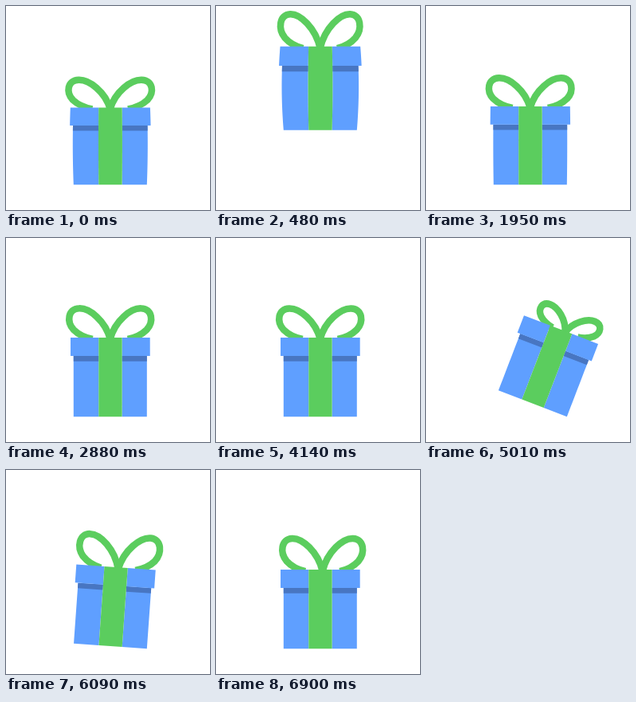
Animation, 256 px wide and 256 px high, one loop 6930 ms. Source, as an HTML page with a canvas:

```html
<!DOCTYPE html>
<html lang="en">
<head>
<meta charset="utf-8">
<title>Bouncing gift</title>
<style>
html, body { margin: 0; width: 100%; height: 100%; overflow: hidden; background: #fff; }
canvas { display: block; width: 100vw; height: 100vh; }
</style>
</head>
<body>
<canvas id="stage" width="256" height="256"></canvas>
<script>
const ctx = document.getElementById('stage').getContext('2d');
const LOOP = 6930, STEP = 30;
const BLUE = '#5f9fff', SHADE = '#4876c2', GREEN = '#5bcd5e';
const MID = 130.7, FLOOR = 224.3, TOP = 125, HEIGHT = FLOOR - TOP, BOW = 41;
const PIVOT = 177;

// Eased value from [time, value] pairs.
function track(t, keys) {
  if (t <= keys[0][0]) return keys[0][1];
  for (let i = 1; i < keys.length; i++) {
    const [t0, a] = keys[i - 1], [t1, b] = keys[i];
    if (t <= t1) {
      const p = (t - t0) / (t1 - t0);
      return a + (b - a) * p * p * (3 - 2 * p);
    }
  }
  return keys[keys.length - 1][1];
}

const arc = (t, from, to, peak) => {
  const p = (t - from) / (to - from);
  return p > 0 && p < 1 ? 4 * peak * p * (1 - p) : 0;
};

// Vertical stretch: positive is taller, negative is squashed.
function stretchAt(t) {
  if (t < 720) {
    return track(t, [[0, -.025], [150, -.25], [300, .2], [450, .05], [620, .13], [720, -.31]]);
  }
  const s = t - 720;
  return t < 3600 ? -.31 * Math.exp(-.0027 * s) * Math.cos(2 * Math.PI * s / 600) : 0;
}

// Tilt in degrees about the lower right corner.
function tiltAt(t) {
  if (t < 4410) return 0;
  if (t < 5430) return 16.5 * (1 - Math.cos(Math.PI * (t - 4410) / 1020));
  if (t < 5850) return 33 * (1 - ((t - 5430) / 420) ** 2);
  return arc(t, 5850, 6300, 4.1) + arc(t, 6300, 6500, .8);
}

function bowAt(t, stretch) {
  return {
    lean: track(t, [[4200, 0], [4350, 6], [5010, 6], [5430, 3], [5800, 4], [5940, -3],
      [6090, 3], [6240, 1], [6480, 5], [6900, 3]]),
    sx: (1 - .6 * stretch) * track(t, [[4380, 1], [5010, .77], [5430, .85], [5850, 1.03],
      [5940, .9], [6090, .98]]),
    sy: (1 + 2 * stretch) * track(t, [[4380, 1], [5010, .68], [5430, .7], [5850, .9],
      [5940, 1.7], [6090, 1.08], [6240, .88], [6450, 1.05], [6900, 1.07]])
  };
}

function warp(x, y, stretch) {
  const v = (FLOOR - y) / HEIGHT;
  const bulge = 1 + .8 * Math.abs(stretch) * 4 * v * (1.05 - v);
  return [MID + (x - MID) * bulge, FLOOR - (FLOOR - y) * (1 + stretch)];
}

function block(left, right, top, bottom, color, stretch) {
  const n = 16;
  ctx.beginPath();
  for (let i = 0; i <= n; i++) ctx.lineTo(...warp(left, top + (bottom - top) * i / n, stretch));
  for (let i = n; i >= 0; i--) ctx.lineTo(...warp(right, top + (bottom - top) * i / n, stretch));
  ctx.fillStyle = color;
  ctx.fill();
}

// One loop of the bow, as offsets from the knot.
function loop(side, bow, lidTop) {
  const at = (x, y) => [MID + bow.lean + side * x * bow.sx, lidTop + y * bow.sy];
  ctx.beginPath();
  ctx.moveTo(...at(0, 2));
  ctx.bezierCurveTo(...at(6, -21), ...at(26, -37), ...at(39, -36.5));
  ctx.bezierCurveTo(...at(53, -36), ...at(55, -20), ...at(46, -10));
  ctx.bezierCurveTo(...at(40, -4), ...at(32, 0), ...at(22, 2));
  ctx.stroke();
}

function draw(t) {
  const stretch = stretchAt(t);
  const bow = bowAt(t, stretch);
  const lidTop = FLOOR - HEIGHT * (1 + stretch);
  ctx.setTransform(1, 0, 0, 1, 0, 0);
  ctx.fillStyle = '#fff';
  ctx.fillRect(0, 0, 256, 256);
  ctx.translate(PIVOT, FLOOR - arc(t, 260, 645, 70));
  ctx.rotate(tiltAt(t) * Math.PI / 180);
  ctx.translate(-PIVOT, -FLOOR);

  ctx.strokeStyle = GREEN;
  ctx.lineWidth = 8.5;
  ctx.lineJoin = 'round';
  loop(-1, bow, lidTop);
  loop(1, bow, lidTop);

  const parts = [[84.8, 116.3, 81, 116.3], [145.6, 176.8, 145.6, 180.7]];
  for (const [left, right, lidLeft, lidRight] of parts) {
    block(left, right, 148, FLOOR, BLUE, stretch);
    block(left, right, 148, 154.7, SHADE, stretch);
    block(lidLeft, lidRight, TOP, 148, BLUE, stretch);
  }
  block(116.3, 145.6, TOP, FLOOR, GREEN, stretch);
}

const start = performance.now();
function tick() {
  const t = (performance.now() - start) % LOOP;
  draw(Math.floor(t / STEP) * STEP);
  requestAnimationFrame(tick);
}
tick();
</script>
</body>
</html>
```
